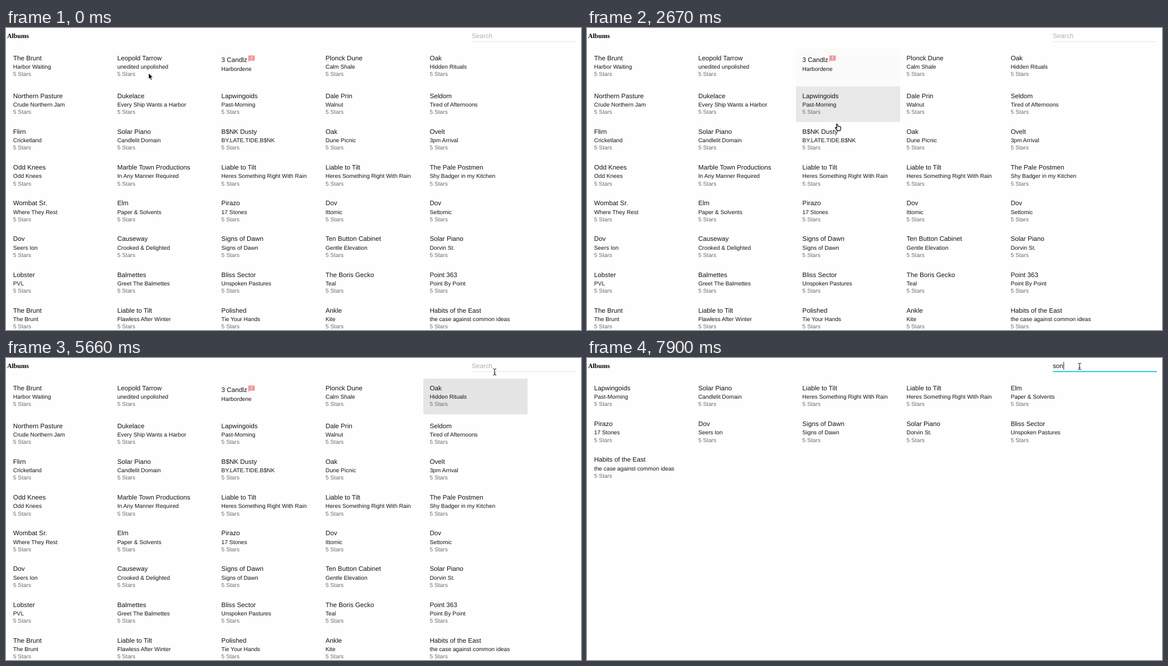
An HTML page that plays this animation: 1032x542 px, repeating every 8000 ms.

```html
<!DOCTYPE html>
<html lang="en">
<head>
<meta charset="utf-8">
<title>Albums</title>
<style>
  html, body { margin: 0; width: 100%; height: 100%; overflow: hidden; background: #fefefe; }
  svg { display: block; width: 1032px; height: 542px; }
  text { font: 11.7px "Liberation Sans", Arial, sans-serif; fill: #151515; text-rendering: geometricPrecision; }
  .title { font: bold 11.7px "Liberation Serif", Times, serif; fill: #000; }
  .album, .stars { font-size: 10.24px; }
  .stars { fill: #6c6c6c; }
  .hint { fill: #b0b0b0; }
</style>
</head>
<body>
<svg viewBox="0 0 1032 542">
  <g id="hovers"></g>
  <text class="title" x="2" y="17.6">Albums</text>
  <rect x="836" y="24" width="187" height="1" fill="#e3e3e3"/>
  <rect id="focus" y="23.6" height="1.6" fill="#00bcd4"/>
  <text id="query" x="836" y="17.8"></text>
  <rect id="caret" y="7" width="1" height="14" fill="#222"/>
  <g id="list"></g>
  <g id="cursor">
    <path id="arrow" d="M0 0V10.8L2.5 8.5L4.2 12.3L5.9 11.5L4.3 7.8H7.6Z" stroke="#fff" stroke-width=".7"/>
    <path id="hand" d="M-3.6-5.2q1.5-1.2 2.2.6l.9 3.2q1-.7 1.8.2q1-.6 1.7.3q1.3-.4 1.5 1q.4 3-1 6h-5.2q-1.2-2.2-3.6-4.4q-.6-1.6 1.3-1.3l1.6 1z" fill="#fff" stroke="#000" stroke-width="1.2"/>
    <path id="beam" d="M-3-5.5Q0-5.5 0-4Q0-5.5 3-5.5M0-4V4M-3 5.5Q0 5.5 0 4Q0 5.5 3 5.5M-1.5 2H1.5" fill="none" stroke="#222" stroke-width="1.1"/>
  </g>
</svg>
<script>
const albums = `The Brunt|Harbor Waiting
Leopold Tarrow|unedited unpolished
3 Candlz|Harbordene
Plonck Dune|Calm Shale
Oak|Hidden Rituals
Northern Pasture|Crude Northern Jam
Dukelace|Every Ship Wants a Harbor
Lapwingoids|Past-Morning
Dale Prin|Walnut
Seldom|Tired of Afternoons
Flirn|Cricketland
Solar Piano|Candlelit Domain
B$NK Dusty|BY.LATE.TIDE.B$NK
Oak|Dune Picnic
Ovelt|3pm Arrival
Odd Knees|Odd Knees
Marble Town Productions|In Any Manner Required
Liable to Tilt|Heres Something Right With Rain
Liable to Tilt|Heres Something Right With Rain
The Pale Postmen|Shy Badger in my Kitchen
Wombat Sr.|Where They Rest
Elm|Paper & Solvents
Pirazo|17 Stones
Dov|Ittomic
Dov|Settomic
Dov|Seers Ion
Causeway|Crooked & Delighted
Signs of Dawn|Signs of Dawn
Ten Button Cabinet|Gentle Elevation
Solar Piano|Dorvin St.
Lobster|PVL
Balmettes|Greet The Balmettes
Bliss Sector|Unspoken Pastures
The Boris Gecko|Teal
Point 363|Point By Point
The Brunt|The Brunt
Liable to Tilt|Flawless After Winter
Polished|Tie Your Hands
Ankle|Kite
Habits of the East|the case against common ideas`.split("\n").map(line => line.split("|"));
const flagged = albums[2]; // has a badge in place of its rating

const STEP = 149.3, HOVER = 8, BEAM = 38, FOCUS = 42, TYPE = 52;
const COLS = 5, COL_W = 187, ROW_H = 64.2, TOP = 37;

// Cursor stops: [capture, x, y]
const stops = [
  [0, 256, 81], [6, 211, 53], [12, 352, 60], [13, 433, 56], [15, 446, 84], [18, 451, 178],
  [19, 456, 192], [21, 575, 95], [23, 602, 77], [31, 658, 57], [35, 870, 62], [BEAM, 877, 25], [40, 884, 15]
];

const $ = id => document.getElementById(id);
const show = (id, on) => $(id).setAttribute("display", on ? "inline" : "none");
const ease = x => 1 - (1 - Math.min(1, Math.max(0, x))) ** 3;
const escape = s => s.replace("&", "&amp;");

// The badge makes the first row a little taller.
const rowTop = (row, extra) => TOP + ROW_H * row + (row > 0 ? extra : 0);

function card(album, i, extra) {
  const x = 12.8 + 186.9 * (i % COLS);
  const y = rowTop(Math.floor(i / COLS), extra) + (album === flagged ? extra : 0);
  const line = (cls, dy, text) => `<text class="${cls}" x="${x}" y="${y + dy}">${escape(text)}</text>`;
  const badge = `<g transform="translate(${x + 421 - 2 * COL_W + 0.2} ${y + 7.7}) scale(.58)">
    <path fill="#ef9a9a" d="M4 2H20q2 0 2 2V16q0 2-2 2H6L2 22V4q0-2 2-2"/>
    <path fill="#fff" d="M11 5h2v6h-2zM11 13h2v2h-2z"/></g>`;
  return line("name", 20.8, album[0]) + line("album", 36.2, album[1]) +
    (album === flagged ? badge : line("stars", 49.4, "5 Stars"));
}

// Fuzzy search: the letters must occur in order within one field.
let shown = null;
function search(query) {
  if (query === shown) return;
  shown = query;
  const pattern = new RegExp([...query].join(".*"), "i");
  const hits = albums.filter(fields => fields.some(f => pattern.test(f)));
  const extra = hits.includes(flagged) ? 3.5 : 0;
  $("list").innerHTML = hits.map((a, i) => card(a, i, extra)).join("");
}

$("hovers").innerHTML = albums.map((a, i) =>
  `<rect x="${1 + COL_W * (i % COLS)}" y="${rowTop(Math.floor(i / COLS), 3.5)}" width="${COL_W}" height="${a === flagged ? 67.5 : 64}"/>`).join("");

function position(n) {
  const k = stops.findIndex(s => s[0] > n);
  if (k < 0) return stops.at(-1).slice(1);
  const [a, x, y] = stops[k - 1], [b, u, v] = stops[k];
  const f = (n - a) / (b - a);
  return [x + (u - x) * f, y + (v - y) * f];
}

function cellAt([x, y]) {
  if (y < TOP) return -1;
  const row = y < rowTop(1, 3.5) ? 0 : Math.floor((y - 3.5 - TOP) / ROW_H);
  return row * COLS + Math.floor((x - 1) / COL_W);
}

// Each capture brings every cell 65% closer to its hover state.
function hoverLevels(n) {
  const levels = albums.map(() => 0);
  for (let k = HOVER - 1; k < n; k++) {
    const cell = cellAt(position(k));
    levels.forEach((v, i) => levels[i] += ((i === cell) - v) * .65);
  }
  return levels;
}

function draw() {
  const n = Math.floor((performance.now() % 8000 + 20) / STEP);

  hoverLevels(n).forEach((v, i) => $("hovers").children[i].setAttribute("fill-opacity", .1 * v));

  $("cursor").setAttribute("transform", `translate(${position(n)})`);
  show("arrow", n < HOVER);
  show("hand", n >= HOVER && n < BEAM);
  show("beam", n >= BEAM);

  const typed = "son".slice(0, n < TYPE ? 0 : n - TYPE + 2);
  search(typed);
  $("query").textContent = typed || "Search";
  $("query").setAttribute("class", typed ? "" : "hint");
  $("caret").setAttribute("x", typed ? 836.3 + $("query").getComputedTextLength() : 836);
  show("caret", typed || (n >= FOCUS && Math.floor((n - FOCUS) / 3) % 2 === 0));

  const width = COL_W * ease((n - FOCUS + 1) / 3);
  $("focus").setAttribute("x", 929.5 - width / 2);
  $("focus").setAttribute("width", width);

  requestAnimationFrame(draw);
}
draw();
</script>
</body>
</html>
```
